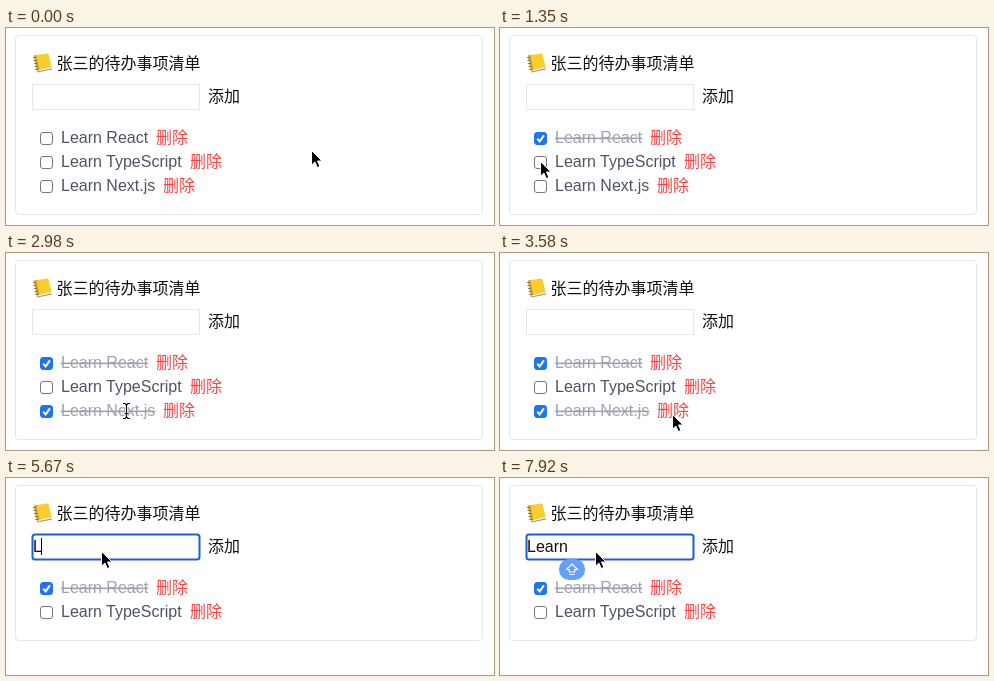
Animation, 488 px wide and 197 px high, one loop 8 s. Source, as an HTML page:

```html
<!DOCTYPE html>
<html lang="zh-CN">
<head>
<meta charset="utf-8">
<title>待办事项清单</title>
<style>
html, body { margin: 0; width: 100%; height: 100%; overflow: hidden; background: #fff; }
svg { display: block; width: 488px; height: 197px; }
text { font: 16px "Liberation Sans", "Noto Sans CJK SC", "Noto Sans CJK", Arial, sans-serif; fill: #111; white-space: pre; }
.label { fill: #4b5563; }
.done .label { fill: #9ca3af; text-decoration: line-through; }
.del { fill: #ef4444; }
.box { fill: #fff; stroke: #767676; }
.pressed .box { fill: #ececec; stroke: #505050; }
.done .box { fill: #1f74f4; stroke: #1f74f4; }
.done.pressed .box { fill: #1460d4; stroke: #1460d4; }
.tick { fill: none; stroke: #fff; stroke-width: 2; visibility: hidden; }
.done .tick { visibility: visible; }
</style>
</head>
<body>
<svg viewBox="0 0 488 197">
  <rect id="card" x="9.5" y="7.5" width="467" height="179" rx="3.5" fill="#fff" stroke="#e5e7eb"/>
  <g id="book">
    <path d="M28 28L31 44.500L46 41.500L45 39Z" fill="#8d8f93"/>
    <path d="M30 42L31.500 43.500L45.500 40.500L44 38Z" fill="#f1f1ee"/>
    <path d="M28 27.500L41 25.500Q42.300 25.500 42.600 26.500L45.700 39L31 42.500Z" fill="#f6cf2e"/>
    <path d="M28 27.500L30.500 27L33.500 42L31 42.500Z" fill="#d9a514"/>
    <path d="M27 29.500h3M27.500 32.500h3M28.100 35.500h3M28.700 38.500h3M29.300 41.500h3" stroke="#77777a"/>
  </g>
  <text x="50.500" y="41">张三的待办事项清单</text>
  <rect id="field" x="26.500" y="56.500" width="167" height="25" fill="#fff" stroke="#e5e7eb"/>
  <text id="typed" x="27" y="74"></text>
  <rect id="caret" y="60" width="1" height="17" fill="#000"/>
  <text x="202" y="74">添加</text>
  <g id="rows"></g>
  <g id="caps">
    <rect x="-13" y="-10.500" width="26" height="21" rx="10" fill="#62a0fa"/>
    <path d="M0 -5.500L5.500 0H2.700V2.500H-2.700V0H-5.500ZM-2.700 5H2.700" fill="none" stroke="#fff" stroke-width="1.200" stroke-linejoin="round"/>
  </g>
  <path id="arrow" d="M.5 .5V15.200L3.900 12L6.300 17.500L8.900 16.400L6.500 11H11Z" fill="#000" stroke="#fff" stroke-linejoin="round"/>
  <g id="beam" fill="none">
    <path id="stem" d="M-3.500 -7.500H-1.500L0 -6L1.500 -7.500H3.500M0 -6V6M-3.500 7.500H-1.500L0 6L1.500 7.500H3.500M-2 2.500H2" stroke="#fff" stroke-width="3"/>
    <path d="M-3.500 -7.500H-1.500L0 -6L1.500 -7.500H3.500M0 -6V6M-3.500 7.500H-1.500L0 6L1.500 7.500H3.500M-2 2.500H2" stroke="#000" stroke-width="1.200"/>
  </g>
</svg>
<script>
const LOOP = 8000;
const $ = id => document.getElementById(id);
const show = (el, on) => el.setAttribute('visibility', on ? 'visible' : 'hidden');
const put = (el, x, y, s = 1) => el.setAttribute('transform', `translate(${x} ${y}) scale(${s})`);
const within = (t, a, b) => t >= a && t < b;

// press: mouse-down times, each followed by a toggle one tick later
const items = [
  { name: 'Learn React', delX: 150, press: [1050] },
  { name: 'Learn TypeScript', delX: 184, press: [1650, 2530] },
  { name: 'Learn Next.js', delX: 157, press: [2250], removed: 3730 }
];
const TICK = 150;

// time, x, y of the pointer
const path = [
  [0, 305, 122], [150, 290, 117], [300, 215, 105], [450, 130, 103], [600, 72, 109],
  [750, 44, 115], [900, 40, 111], [1200, 40, 111], [1350, 40, 133], [1800, 40, 133],
  [2100, 39, 160], [2400, 39, 160], [2530, 39, 134], [2680, 39, 134],
  [2980, 120, 158], [3430, 172, 161], [3730, 172, 161], [4180, 97, 76]
];

// time, text after that key
const keys = [[5670, 'L'], [6270, 'Le'], [6570, 'Lea'], [6870, 'Lear'], [7020, 'Learn'], [7170, 'Learn ']];

const caretAt = { '': 27, L: 35, Le: 44, Lea: 53, Lear: 58, Learn: 67, 'Learn ': 72 };

$('rows').innerHTML = items.map((item, i) => `
  <g>
    <rect class="box" x="34.5" y="${104.5 + 24 * i}" width="12" height="12" rx="2.5"/>
    <path class="tick" d="M37.300 ${110.8 + 24 * i}l2.400 2.600l4.200 -6"/>
    <text class="label" x="55" y="${115 + 24 * i}">${item.name}</text>
    <text class="del" x="${item.delX}" y="${115 + 24 * i}">删除</text>
  </g>`).join('');
const rows = [...$('rows').children];

function pointer(t) {
  const lag = t < 2500 ? 0 : 20;
  const q = Math.floor((t + lag) / TICK) * TICK - lag;
  const i = path.findIndex(p => p[0] > q);
  if (i < 0) return path[path.length - 1].slice(1);
  const [a, b] = [path[i - 1], path[i]];
  const k = (q - a[0]) / (b[0] - a[0]);
  return [a[1] + (b[1] - a[1]) * k, a[2] + (b[2] - a[2]) * k].map(Math.round);
}

function drawPointer(t) {
  const [x, y] = t < 5520 ? pointer(t) : [95, 73];
  const overText = within(t, 450, 750) || within(t, 2830, 3280) || within(t, 4180, 4630);
  show($('beam'), overText);
  show($('arrow'), !overText && !within(t, 4630, 5520));
  put($('beam'), x + .5, y);
  put($('arrow'), x, y);
}

function drawField(t) {
  const focus = t >= 4330;
  const f = $('field');
  f.setAttribute('stroke', focus ? '#1f5fc9' : '#e5e7eb');
  f.setAttribute('stroke-width', focus ? 2 : 1);
  f.setAttribute('rx', focus ? 2.5 : 0);

  const text = keys.reduce((s, k) => t >= k[0] ? k[1] : s, '');
  const x = caretAt[text];
  $('typed').textContent = text;
  $('caret').setAttribute('x', x);
  show($('caret'), focus && t < 7620);

  const fading = within(t, 5520, 5670) || within(t, 6120, 6270);
  show($('caps'), within(t, 5370, 5670) || within(t, 6120, 6270) || t >= 7920);
  $('caps').setAttribute('opacity', fading ? .7 : 1);
  put($('caps'), x, 91.5, fading ? 1.12 : 1);
}

function draw(t) {
  items.forEach((item, i) => {
    const toggles = item.press.filter(p => t >= p + TICK).length;
    rows[i].classList.toggle('done', toggles % 2 === 1);
    rows[i].classList.toggle('pressed', item.press.some(p => within(t, p, p + TICK)));
    show(rows[i], !(t >= item.removed));
    rows[i].style.display = t >= item.removed ? 'none' : '';
  });
  $('card').setAttribute('height', t < 3730 ? 179 : 155);
  drawField(t);
  drawPointer(t);
}

const start = performance.now();
function frame() {
  draw((performance.now() - start) % LOOP);
  requestAnimationFrame(frame);
}
frame();
</script>
</body>
</html>
```
